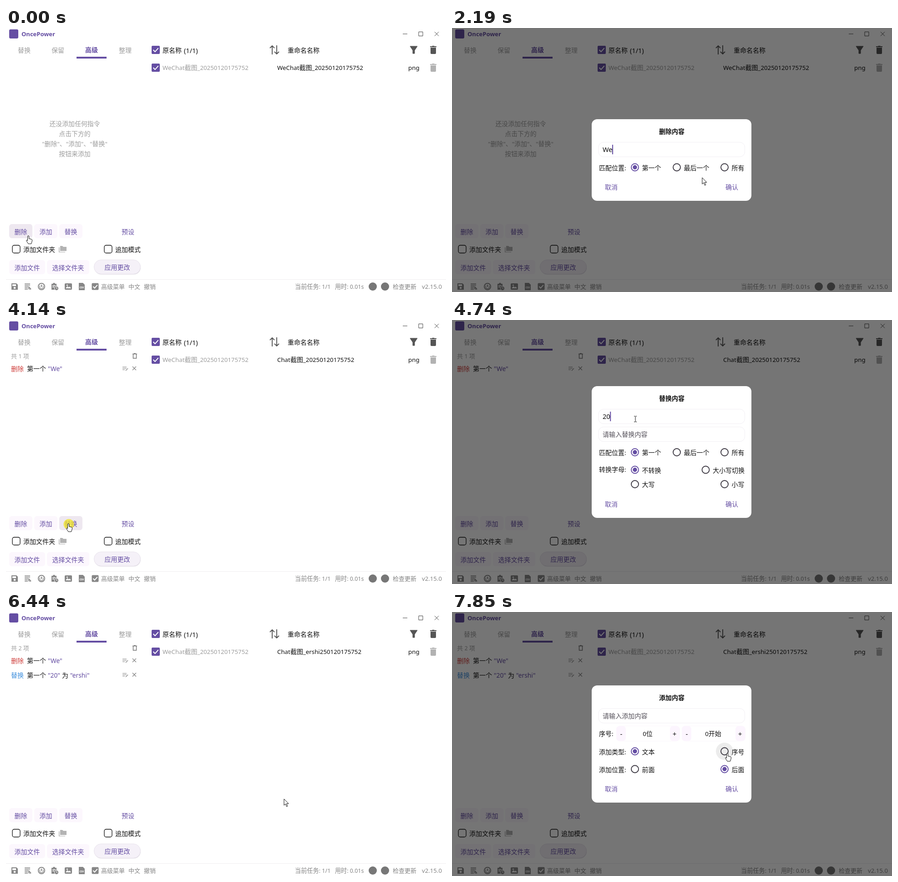
Write an HTML page that moves like this. It is 967x579 px and loops after 8 s.

```html
<!DOCTYPE html>
<html lang="zh-CN">
<head>
<meta charset="utf-8">
<style>
html, body { margin: 0; width: 100%; height: 100%; overflow: hidden; background: #fff }
svg { display: block; width: 967px; height: 579px }
text { font-family: "Noto Sans", "Noto Sans CJK SC", sans-serif; white-space: pre }
</style>
</head>
<body>
<svg id="stage" viewBox="0 0 967 579"></svg>
<script>
const LOOP = 8000, PURPLE = '#654ea3', GRAY = '#9d9d9d', INK = '#111', BAR = '#878787';
const $ = id => document.getElementById(id);

// Latin letters run a little smaller than the CJK glyphs beside them.
const runs = (s, size) => s.replace(/[!-~]+( +[!-~]+)*/g, m => `<tspan font-size="${size * .95}">${m}</tspan>`);
const text = (x, y, s, { c = INK, size = 14, mid, bold, id = '' } = {}) =>
  `<text id="${id}" x="${x}" y="${y + size * .37}" fill="${c}" font-size="${size}"` +
  ` text-anchor="${mid ? 'middle' : 'start'}" font-weight="${bold ? 600 : 400}">${runs(s, size)}</text>`;
const rect = (x, y, w, h, r, fill, more = '') =>
  `<rect x="${x}" y="${y}" width="${w}" height="${h}" rx="${r}" fill="${fill}" ${more}/>`;
const circle = (x, y, r, fill, more = '') => `<circle cx="${x}" cy="${y}" r="${r}" fill="${fill}" ${more}/>`;
const shape = (x, y, d, fill, more = '') => `<path transform="translate(${x} ${y})" d="${d}" fill="${fill}" ${more}/>`;
const line = (x, y, d, c, w = 1.5) => shape(x, y, d, 'none', `stroke="${c}" stroke-width="${w}"`);
const group = (id, s) => `<g id="${id}">${s}</g>`;

const tick = (x, y, s, c) => rect(x, y, s, s, 2, c) +
  line(x, y, `M${s * .2} ${s * .5}l${s * .22} ${s * .23}L${s * .82} ${s * .28}`, '#fff', 2);
const trash = (y, c) => shape(939, y, 'M-7-8h4l1-1h4l1 1h4v2H-7zM-6-5H6V7q0 2-2 2h-8q-2 0-2-2z', c);
const button = (x, y, w, s, id) => rect(x, y, w, 31, 6, '#fcf7fd') +
  (id ? rect(x, y, w, 31, 6, '#eee8f0', `id="${id}"`) : '') + text(x + w / 2, y + 16.5, s, { c: PURPLE, mid: 1 });
const box = (x, s) => rect(x, 476.5, 17, 17, 4, '#fff', `stroke="${INK}" stroke-width="1.3"`) + text(x + 24, 486, s);
const item = (y, verb, c, body) => text(11, y, verb, { c }) + body +
  line(256, y, 'M0-4h9M0-1h9M0 2h5M7 4l5-5', '#858585', 1.2) + line(282, y - 1, 'M-4-4l8 8M4-4l-8 8', '#858585', 1.3);

function windowArt() {
  const close = 'M-4.5-4.5l9 9M4.5-4.5l-9 9';
  const q = { c: PURPLE, size: 14.5 };
  return rect(7, 3, 20, 20, 3, PURPLE) + text(34, 13, 'OncePower', { c: PURPLE, size: 13.7, bold: 1 }) +
    line(872, 13, 'M0 0h10', '#444', 1) + line(907, 8.5, 'M0 0h9v9h-9z', '#444', 1) + line(946.5, 13, close, '#444', 1) +
    [['替换', 40], ['保留', 114], ['整理', 262]].map(([s, x]) => text(x, 49, s, { c: GRAY, mid: 1 })).join('') +
    text(188, 47.5, '高级', { c: PURPLE, mid: 1, bold: 1 }) + rect(155, 63, 66, 4, 0, PURPLE) +
    tick(320, 39, 18, PURPLE) + text(344, 49, '原名称') + text(391, 49, '(1/1)', { size: 15.3 }) +
    line(590, 48, 'M-5 10V-8M-10-4l5-5 5 5M5-10V8M0 4l5 5 5-5', '#555', 1.9) + text(619, 49, '重命名名称') +
    shape(896, 48, 'M-8-8h16L2 1v7h-4V1z', '#555', 'stroke="#555" stroke-linejoin="round"') + trash(48, '#555') +
    tick(320, 78, 18, PURPLE) + text(344, 87, 'WeChat截图_20250120175752', { c: GRAY }) +
    text(596, 87, '', { id: 'renamed' }) + text(884, 87, 'png') + trash(87, '#b2b2b2') +
    group('empty', ['还没添加任何指令', '点击下方的', '"删除"、"添加"、"替换"', '按钮来添加']
      .map((s, i) => text(151, 210 + i * 21.8, s, { c: GRAY, size: 13.9, mid: 1 })).join('')) +
    group('list', text(11, 79, '', { c: GRAY, size: 13, id: 'count' }) +
      line(283, 79, 'M-5-4.500h10M-2-5.500h4M-3.500-4v9h7v-9', '#777') +
      item(107, '删除', '#cf3f3c', text(46, 107, '第一个') + text(92, 107, '"We"', q))) +
    group('second', item(138.5, '替换', '#3f8fdd', text(46, 138.5, '第一个') + text(92, 138.5, '"20"', q) +
      text(123, 138.5, '为') + text(141, 138.5, '"ershi"', q))) +
    button(7, 430, 51, '删除', 'hot0') + button(62, 430, 51, '添加', 'hot1') + button(117, 430, 51, '替换', 'hot2') +
    text(268, 447, '预设', { c: PURPLE, mid: 1 }) + box(14, '添加文件夹') + box(216, '追加模式') +
    shape(116, 477, 'M3 1h5l2 2h7v9H3zM0 4h1.500v10H14v1H0z', '#b3b3b3') +
    button(7, 509, 79, '添加文件') + button(90, 509, 93, '选择文件夹') +
    rect(194, 509.5, 102, 31, 15.5, '#d9d4dd') + rect(193.5, 508.5, 102, 31, 15.5, '#f5f1f8', 'stroke="#e9e4ed"') +
    text(244.5, 525, '应用更改', { c: PURPLE, mid: 1 }) + statusBar();
}

function statusBar() {
  const c = '#858585';
  const put = (x, s, size = 13) => text(x, 567, s, { c, size });
  return rect(0, 551, 967, 1, 0, '#efedf0') +
    shape(19, 567, 'M-7-7H4l3 3V7H-7z', BAR) + rect(14, 562, 8, 4, 0, '#fff') + circle(19, 570, 2.3, '#fff') +
    line(48, 567, 'M-7-6H5M-7-3H5M-7 0H1M-7 3H0M-7 6H0M2 0l5 6M2 0v5l5 1', BAR, 1.6) +
    circle(78, 567, 7, 'none', `stroke="${BAR}" stroke-width="2"`) + line(78, 567, 'M0-4V1', BAR, 2) +
    line(78, 567, 'M-3-2a4 4 0 1 0 6 0', BAR, 1.4) +
    shape(106, 567, 'M-6-6h3l1-2h3l1 2h3V7H-6z', BAR) + line(106, 567, 'M-4-2h7M-4 1h4', '#fff', 1.3) +
    circle(111, 571, 4.5, BAR, 'stroke="#fff"') + line(111, 571, 'M0-2.500V0h2', '#fff', 1) +
    rect(129, 560, 16, 14, 2, BAR) + shape(137, 567, 'M-6 4l4-5 3 3 2-2 3 4zM-4-4h3v2h-3z', '#fff') +
    shape(166, 567, 'M-6-8H3l4 4V8H-6z', BAR) + text(166.5, 569, 'csv', { c: '#fff', size: 6.5, mid: 1, bold: 1 }) +
    tick(188.5, 559.5, 15, BAR) + put(209, '高级菜单') + put(269, '中文') + put(303, '撤销') +
    put(635, '当前任务: 1/1', 13.2) + put(723, '用时: 0.01s', 13.1) +
    circle(806, 567, 9, '#777') + circle(833, 567, 9, '#777') + put(850, '检查更新') + put(914, 'v2.15.0', 13.9);
}

const radio = (x, y, s, on) =>
  circle(x, y - .5, 8, 'none', `stroke="${on ? PURPLE : '#3f3b45'}" stroke-width="1.9"`) +
  (on ? circle(x, y - .5, 4.7, PURPLE) : '') + text(x + 15.5, y + .5, s);
const field = (y, hint, id) => rect(322, y + .5, 321.5, 32, 11, '#fff', 'stroke="#f2eff4"') +
  text(331, y + 16.5, hint, { c: '#55515a', size: 14.1, id: id + 'Hint' }) +
  text(331, y + 16.5, '', { size: 15.4, id }) + rect(331, y + 6, 2, 21, 0, PURPLE, `id="${id}Caret"`);
const dialog = (id, y, h, title, body) => group(id,
  rect(307, y, 351, h, 12, '#fff') + text(483, y + 27, title, { mid: 1, bold: 1 }) + body +
  rect(588, y + h - 46, 55, 31, 15.5, '#f0ebf3', `id="${id}Ok"`) +
  text(350, y + h - 30, '取消', { c: PURPLE, mid: 1 }) + text(615, y + h - 30, '确认', { c: PURPLE, mid: 1 }));
const places = y => text(323, y + .5, '匹配位置:') + radio(402, y, '第一个', 1) + radio(494, y, '最后一个') + radio(599, y, '所有');
const stepper = (x, s) => rect(x + .5, 250, 139, 33, 8, '#fff', 'stroke="#faf6fb"') +
  rect(x, 250, 21, 33, 7, '#fcf5fe') + rect(x + 118, 250, 21, 33, 7, '#fcf5fe') +
  text(x + 11, 267, '-', { mid: 1, size: 16 }) + text(x + 69, 267, s, { mid: 1 }) + text(x + 128, 267, '+', { mid: 1, size: 16 });

$('stage').innerHTML = windowArt() + rect(0, 0, 967, 579, 0, '#000', 'id="shade"') +
  dialog('del', 200, 179, '删除内容', field(250, '请输入删除内容', 'cut') + places(306)) +
  dialog('rep', 145, 289, '替换内容', field(195, '请输入匹配内容', 'from') + field(234, '请输入替换内容', 'to') + places(290.5) +
    text(323, 328, '转换字母:') + radio(402, 329, '不转换', 1) + radio(557.5, 329, '大小写切换') +
    radio(402, 360.5, '大写') + radio(599, 360.5, '小写')) +
  dialog('add', 161, 257, '添加内容', field(211, '请输入添加内容', 'extra') + text(323, 267, '序号:') +
    stepper(361, '0位') + stepper(505, '0开始') + text(323, 306.5, '添加类型:') + radio(402, 306, '文本', 1) +
    circle(599, 305.5, 19, '#ececec', 'id="halo"') + radio(599, 306, '序号') +
    text(323, 345.5, '添加位置:') + radio(402, 345, '前面') + radio(599, 345, '后面', 1)) +
  group('mouse', circle(1, 1, 11.5, '#f0e424', 'id="click" opacity=".75"') +
    shape(0, 0, 'M0 0v14l3.200-3 2.500 5.800 2.200-1-2.500-5.500h4.600z', '#fff', 'id="arrow" stroke="#111"') +
    shape(0, 0, 'M-1.500 1c0-1.800 3-1.800 3 0v5l5.200 1.200q2 .5 1.800 2.600l-.8 4-1.200 3.500H0l-4-6.300c-1-1.800.7-2.500 1.600-1.400l.9 1z',
      '#fff', 'id="hand" stroke="#111" stroke-linejoin="round"') +
    group('beam', line(0, 0, 'M-3-6h2.500M.5-6H3M0-5.500V6M-3 6.500h2.500M.5 6.500H3', '#111', 1)));

const ramp = (t, a, b) => Math.min(1, Math.max(0, (t - a) / (b - a)));
const during = (t, ...spans) => spans.some(([a, b]) => t >= a && t < b);
const show = (id, on) => $(id).style.display = on ? '' : 'none';
const write = (id, s, size = 14) => {
  const el = $(id);
  if (el.dataset.s !== s) { el.dataset.s = s; el.innerHTML = runs(s, size); }
};
// The last step whose time has come: [time, value] pairs.
const at = (t, steps) => steps.reduce((v, [from, s]) => t >= from ? s : v, '');

const path = [[0, 49, 456], [200, 49, 456], [860, 394, 262], [1790, 394, 262], [2400, 608, 353], [3190, 608, 353],
  [3740, 167, 480], [3940, 137, 447], [4210, 137, 447], [4670, 403, 217], [5660, 403, 217], [6100, 611, 410],
  [6450, 611, 410], [6710, 79, 448], [7440, 79, 448], [7850, 605, 310]];
function pointer(t) {
  const i = path.findIndex(p => p[0] > t);
  if (i < 0) return path[path.length - 1].slice(1);
  const a = path[i - 1], b = path[i], u = ramp(t, a[0], b[0]), e = u * u * (3 - 2 * u);
  return [1, 2].map(k => a[k] + (b[k] - a[k]) * e);
}

function type(id, t, steps, focus, blur) {
  const s = at(t, steps);
  write(id, s, 15.4);
  show(id + 'Hint', !s);
  show(id + 'Caret', during(t, [focus, blur]));
  $(id + 'Caret').setAttribute('x', 330.5 + (s && $(id).getComputedTextLength()));
}

function draw(t) {
  const fade = {
    del: ramp(t, 200, 400) * (1 - ramp(t, 2735, 2870)),
    rep: ramp(t, 4200, 4400) * (1 - ramp(t, 6260, 6430)),
    add: ramp(t, 7430, 7630)
  };
  for (const id in fade) {
    show(id, fade[id] > 0);
    $(id).setAttribute('opacity', fade[id] ** 1.2);
  }
  $('shade').setAttribute('opacity', .54 * Math.max(...Object.values(fade)));

  const tail = '250120175752';
  write('renamed', at(t, [[0, 'WeChat截图_20' + tail], [2670, 'Chat截图_20' + tail], [6200, 'Chat截图_ershi' + tail]]));
  write('count', t < 6200 ? '共 1 项' : '共 2 项', 13);
  show('empty', t < 2670);
  show('list', t >= 2670);
  show('second', t >= 6200);

  type('cut', t, [[1190, 'W'], [1330, 'We']], 200, 2600);
  type('from', t, [[4670, '2'], [4740, '20']], 4200, 4870);
  type('to', t, [[5000, 'e'], [5130, 'er'], [5330, 'ers'], [5470, 'ershi']], 4870, 6130);
  type('extra', t, [], 0, 0);

  show('hot0', t < 270);
  show('hot1', during(t, [6670, 7510]));
  show('hot2', during(t, [3870, 4280]));
  show('delOk', t >= 2330);
  show('repOk', t >= 6040);
  show('addOk', false);
  show('halo', t >= 7780);

  const hand = during(t, [0, 270], [3870, 4280], [6670, 7510], [7780, LOOP]);
  const beam = during(t, [690, 1880], [4530, 5740]);
  $('mouse').setAttribute('transform', `translate(${pointer(t)})`);
  show('mouse', !during(t, [1190, 1790], [5000, 5660]));
  show('hand', hand);
  show('beam', beam);
  show('arrow', !hand && !beam);
  show('click', during(t, [130, 270], [2600, 2740], [4140, 4280], [6130, 6270], [7370, 7510]));
}

const start = performance.now();
(function frame() {
  draw((performance.now() - start) % LOOP);
  requestAnimationFrame(frame);
})();
</script>
</body>
</html>
```
